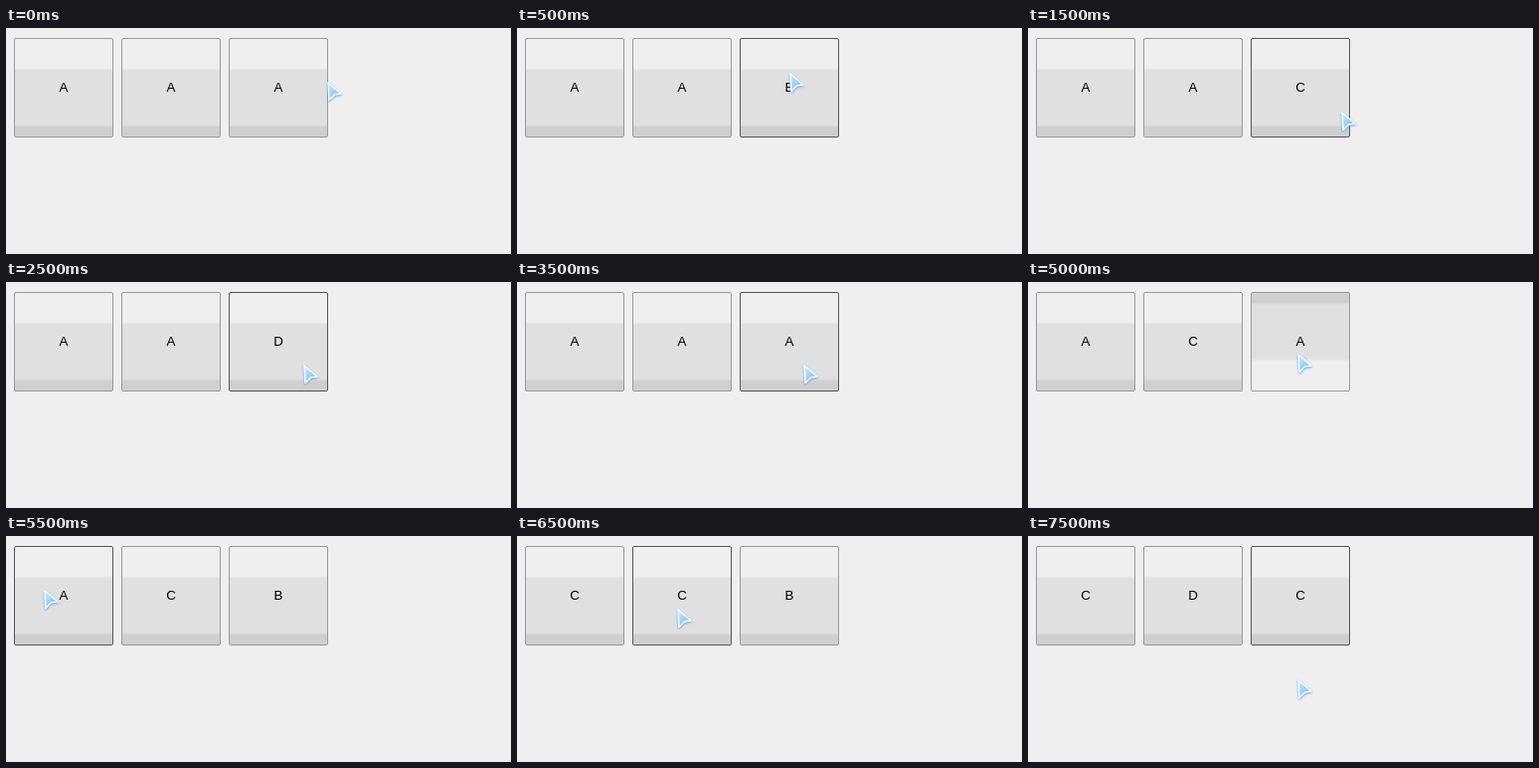
An HTML page that plays this animation: 508 px wide and 227 px high, repeating every 8000 ms.

```html
<!DOCTYPE html>
<html lang="en">
<head>
<meta charset="utf-8">
<title>Letter buttons</title>
<style>
  html, body { margin: 0; width: 100%; height: 100%; overflow: hidden; background: #efefef; }
  .key {
    position: absolute; top: 10px; box-sizing: border-box; width: 100px; height: 100px;
    border: 1px solid #999; border-radius: 2px;
    font: 13.333px/98px "Liberation Sans", Arial, sans-serif; text-align: center; color: #000;
    --dir: to bottom;
    background: linear-gradient(var(--dir), #efefef 29px, #e0e0e0 32px, #e0e0e0 86px, #cfcfcf 89px) padding-box;
  }
  .hover { border-color: #555; }
  .down { --dir: to top; }
  #cursor {
    position: absolute; left: 0; top: 0; overflow: visible;
    filter: drop-shadow(.5px 1px 1px #5f9fe0);
  }
</style>
</head>
<body>
<div class="key" style="left:8px"></div>
<div class="key" style="left:116px"></div>
<div class="key" style="left:224px"></div>
<svg id="cursor" width="18" height="23">
  <linearGradient id="ice" x2=".6" y2="1">
    <stop stop-color="#d3ecfc"/>
    <stop offset="1" stop-color="#7fbcf0"/>
  </linearGradient>
  <path d="M2 2L15 13L8.500 14L3 19.500Z" fill="url(#ice)" stroke="#f4faff" stroke-width="1.600" stroke-linejoin="round"/>
</svg>
<script>
  const STEP = 500;
  // letters, cursor x, cursor y, active key, pressed
  const states = [
    ["AAA", 322, 53],
    ["AAB", 273, 44, 2],
    ["AAB", 290, 66, 2],
    ["AAC", 314, 83, 2],
    ["AAC", 297, 80, 2],
    ["AAD", 298, 82, 2],
    ["AAA", 292, 82, 2, true],
    ["AAA", 287, 82, 2],
    ["AAA", 156, 70, 1, true],
    ["ABA", 162, 71, 1, true],
    ["ACA", 270, 71, 2, true],
    ["ACB", 37, 53, 0],
    ["BCB", 49, 87, 0],
    ["CCB", 160, 72, 1],
    ["CDB", 270, 184],
    ["CDC", 270, 143, 2]
  ];
  const keys = document.querySelectorAll(".key");
  const cursor = document.getElementById("cursor");
  let shown = -1;

  function show([letters, x, y, active, pressed]) {
    keys.forEach((key, i) => {
      key.textContent = letters[i];
      key.classList.toggle("hover", i === active && !pressed);
      key.classList.toggle("down", i === active && !!pressed);
    });
    cursor.style.transform = `translate(${x}px, ${y}px)`;
  }

  function tick() {
    const step = Math.floor(performance.now() / STEP) % states.length;
    if (step !== shown) show(states[shown = step]);
    requestAnimationFrame(tick);
  }
  tick();
</script>
</body>
</html>
```
